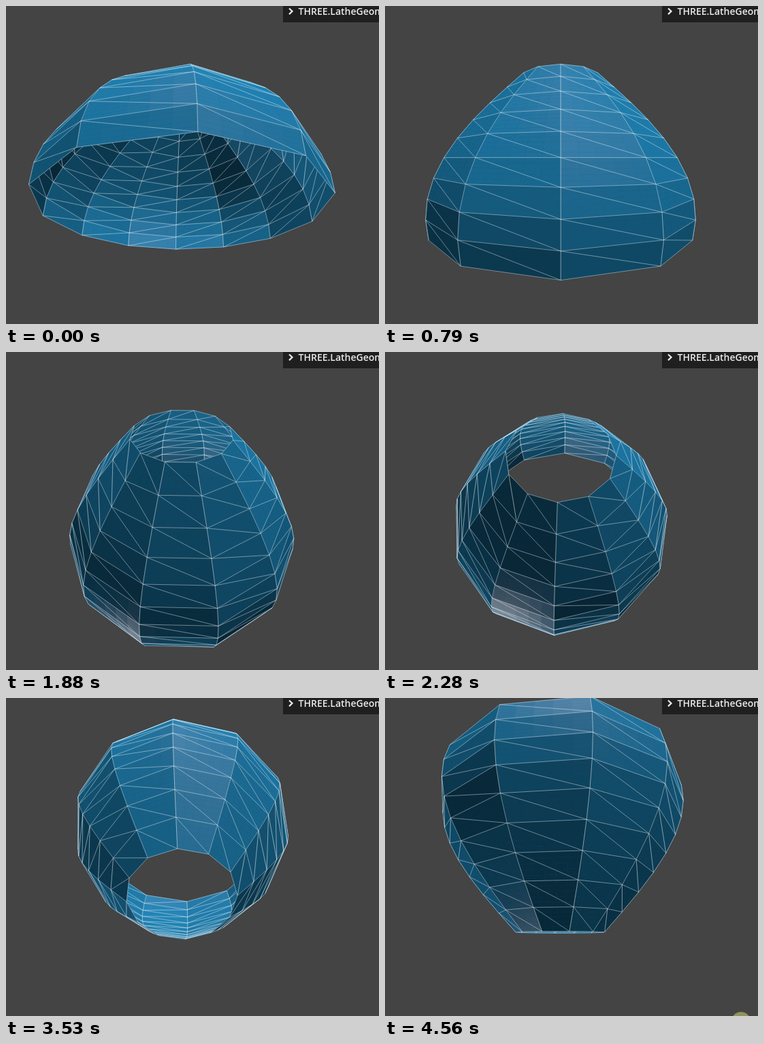
Recreate the animation shown at these times as an HTML page with a canvas. Size 548x467 px, loop 4590 ms.

```html
<!DOCTYPE html>
<html lang="en">
<head>
<meta charset="utf-8">
<title>Lathe geometry</title>
<style>
  html, body { margin: 0; width: 100%; height: 100%; overflow: hidden; background: #444; }
  canvas { position: absolute; left: 0; top: 0; }
  .panel {
    position: absolute; left: 407px; top: 0; width: 141px; height: 24px;
    overflow: hidden; background: #1f1f1f; color: #ebebeb;
    font: 600 14px/16px "Open Sans", "Noto Sans", sans-serif; white-space: nowrap;
  }
  .panel span { position: absolute; left: 22.5px; top: 0; }
  .panel svg { position: absolute; left: 7px; top: 2px; }
</style>
</head>
<body>
<canvas id="stage" width="548" height="467"></canvas>
<div class="panel">
  <svg width="10" height="12"><path d="M2 1.5 6.5 5.8 2 10.1" fill="none" stroke="#ebebeb" stroke-width="2.2"/></svg>
  <span>THREE.LatheGeometry</span>
</div>
<script>
const ctx = document.getElementById('stage').getContext('2d');
const LOOP = 4590, STEPS = 139;
const START_ANGLE = 2.555, STEP_ANGLE = 0.02442;
const SEGMENTS = 12, RINGS = 10, CELLS = 5;
const CAMERA = [0, 0, 30], FOCAL = 343.5, CX = 258, CY = 222.7;

const dot = (a, b) => a[0] * b[0] + a[1] * b[1] + a[2] * b[2];
const sub = (a, b) => a.map((v, i) => v - b[i]);
const add = (a, b) => a.map((v, i) => v + b[i]);
const mix = (a, b, f) => a.map((v, i) => v + (b[i] - v) * f);
const scale = (a, s) => a.map(v => v * s);
const unit = a => scale(a, 1 / Math.hypot(...a));
const cross = (a, b) => [
  a[1] * b[2] - a[2] * b[1],
  a[2] * b[0] - a[0] * b[2],
  a[0] * b[1] - a[1] * b[0]
];

const toLinear = v => ((v / 255 + 0.055) / 1.055) ** 2.4;
const toSRGB = v => Math.round(255 * (v < 0.0031308 ? v * 12.92 : 1.055 * Math.min(v, 1) ** (1 / 2.4) - 0.055));

const DIFFUSE = [21, 98, 137].map(toLinear);
const EMISSIVE = [0.0021, toLinear(37), toLinear(52)];
const SPECULAR = 0.0056, SHININESS = 30, INTENSITY = 3;
const LIGHTS = [[0, 1, 0], [1, 2, 1], [-1, -2, -1]].map(unit);

// Blinn-Phong with a Schlick Fresnel term, in linear light
function shade(point, normal) {
  const view = unit(sub(CAMERA, point));
  let diffuse = 0, gloss = 0;
  for (const light of LIGHTS) {
    const power = INTENSITY * Math.max(0, dot(normal, light));
    if (!power) continue;
    const half = unit(add(light, view));
    const vh = Math.max(0, dot(view, half));
    const fresnel = 2 ** ((-5.55473 * vh - 6.98316) * vh);
    const lobe = (SHININESS / 2 + 1) / Math.PI * Math.max(0, dot(normal, half)) ** SHININESS;
    diffuse += power / Math.PI;
    gloss += power * 0.25 * lobe * (SPECULAR * (1 - fresnel) + fresnel);
  }
  return `rgb(${DIFFUSE.map((c, i) => toSRGB(EMISSIVE[i] + c * diffuse + gloss))})`;
}

function project([x, y, z]) {
  const s = FOCAL / (CAMERA[2] - z);
  return [CX + x * s, CY - y * s];
}

// Profile vertex, spun about the axis and tilted by the same angle
function vertex(column, ring, angle) {
  const r = Math.sin(ring * 0.2) * 10 + 5, y = (ring - 5) * 2;
  const phi = column * 2 * Math.PI / SEGMENTS + angle;
  const z = r * Math.cos(phi), c = Math.cos(angle), s = Math.sin(angle);
  return [r * Math.sin(phi), y * c - z * s, y * s + z * c];
}

function buildQuads(angle) {
  const quads = [];
  for (let i = 0; i < SEGMENTS; i++) {
    for (let j = 0; j < RINGS - 1; j++) {
      const a = vertex(i, j, angle), b = vertex(i + 1, j, angle);
      const c = vertex(i + 1, j + 1, angle), d = vertex(i, j + 1, angle);
      let normal = unit(cross(sub(b, a), sub(d, a)));
      if (dot(normal, a) < 0) normal = scale(normal, -1);
      const outer = dot(normal, sub(CAMERA, a)) > 0;
      if (!outer) normal = scale(normal, -1);
      quads.push({ corners: [a, b, c, d], normal, outer });
    }
  }
  return quads;
}

function fillQuad({ corners: [a, b, c, d], normal }) {
  const at = (u, v) => mix(mix(a, b, u), mix(d, c, u), v);
  for (let i = 0; i < CELLS; i++) {
    for (let j = 0; j < CELLS; j++) {
      const u = i / CELLS, v = j / CELLS, n = 1 / CELLS;
      ctx.fillStyle = ctx.strokeStyle = shade(at(u + n / 2, v + n / 2), normal);
      ctx.beginPath();
      for (const p of [at(u, v), at(u + n, v), at(u + n, v + n), at(u, v + n)]) ctx.lineTo(...project(p));
      ctx.closePath();
      ctx.fill();
      ctx.stroke();
    }
  }
}

// Neighbouring quads share edges, so each one is drawn once
function drawWires(quads) {
  const wires = new Path2D(), steep = new Path2D(), seen = new Set();
  const line = (path, p, q) => { path.moveTo(...p); path.lineTo(...q); };
  for (const { corners } of quads) {
    const [a, b, c, d] = corners.map(project);
    for (const [p, q] of [[a, b], [b, c], [c, d], [d, a], [b, d]]) {
      const key = add(p, q).map(v => Math.round(v * 20)).join();
      if (seen.has(key)) continue;
      seen.add(key);
      line(wires, p, q);
      const dx = Math.abs(p[0] - q[0]), dy = Math.abs(p[1] - q[1]);
      if (dx < 0.22 * dy) line(steep, p, q);
    }
  }
  ctx.lineWidth = 0.85;
  ctx.strokeStyle = 'rgba(255,255,255,.48)';
  ctx.stroke(wires);
  ctx.strokeStyle = 'rgba(255,255,255,.15)';
  ctx.stroke(steep);
}

function draw(step) {
  ctx.fillStyle = '#444';
  ctx.fillRect(0, 0, 548, 467);
  ctx.lineJoin = 'round';
  const quads = buildQuads(START_ANGLE + step * STEP_ANGLE);
  // The body is convex, so the inside always lies behind the outside
  for (const outer of [false, true]) {
    const layer = quads.filter(q => q.outer === outer);
    ctx.lineWidth = 0.5;
    layer.forEach(fillQuad);
    drawWires(layer);
  }
  // Pointer highlight rising from the bottom edge
  ctx.fillStyle = '#91945a';
  ctx.beginPath();
  ctx.arc(523, 475 + (STEPS - 1 - step) * 2, 14, 0, 7);
  ctx.fill();
}

let shown = -1;
function tick() {
  const t = performance.now() % LOOP;
  const step = Math.min(STEPS - 1, Math.floor(t / LOOP * STEPS + 0.2));
  if (step !== shown) draw(shown = step);
  requestAnimationFrame(tick);
}
tick();
</script>
</body>
</html>
```
